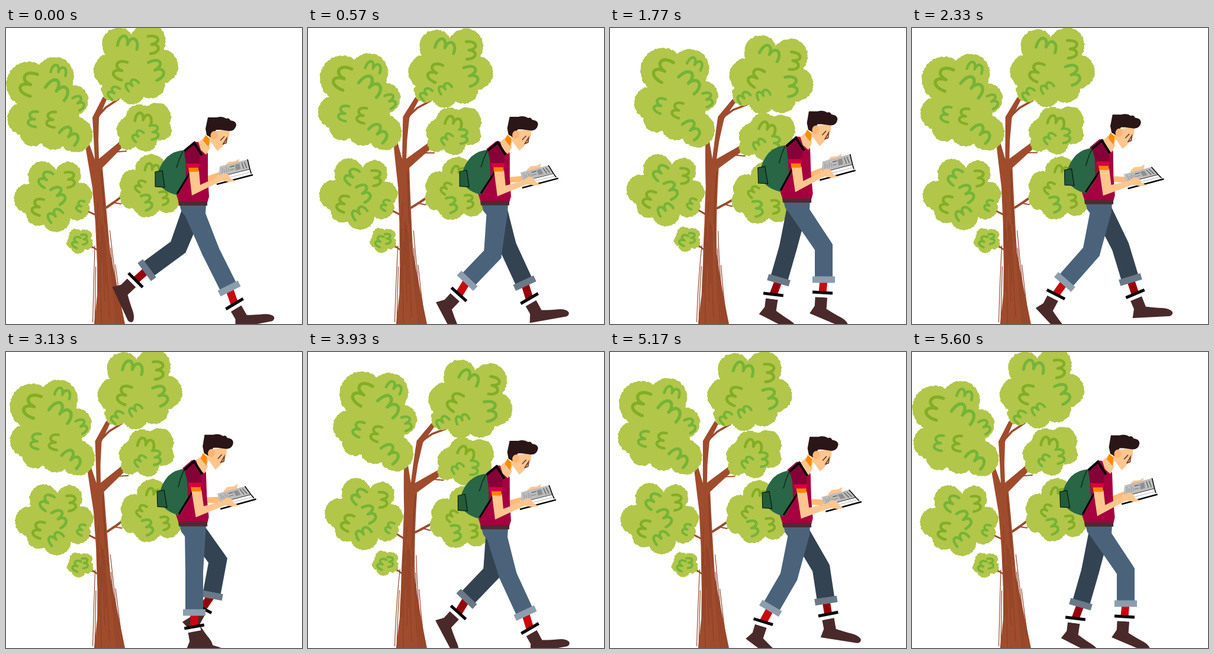
An HTML page with a canvas that plays this animation: 500x500 px, repeating every 5.66 s.

```html
<!DOCTYPE html>
<html lang="en">
<head>
<meta charset="utf-8">
<title>Walking reader</title>
<style>
  html, body { margin: 0; width: 100%; height: 100%; overflow: hidden; background: #fff; }
  canvas { display: block; width: 500px; height: 500px; }
</style>
</head>
<body>
<canvas id="stage" width="500" height="500"></canvas>
<script>
const ctx = document.getElementById('stage').getContext('2d');
const TAU = Math.PI * 2, LOOP = 5660, FRAMES = 141, STRIDE = 24;
const SKIN = '#ffc68e', INK = '#050505';

let seed = 7;
const rand = () => (seed = (seed * 16807) % 2147483647) / 2147483647;
const mix = (a, b, t) => a + (b - a) * t;

// pts is a flat list: x, y, x, y ...
function trace(pts, close) {
  ctx.beginPath();
  for (let i = 0; i < pts.length; i += 2) ctx.lineTo(pts[i], pts[i + 1]);
  if (close) ctx.closePath();
}
function fill(color, pts) {
  trace(pts, true);
  ctx.fillStyle = color;
  ctx.fill();
}
function line(color, width, pts) {
  trace(pts);
  ctx.strokeStyle = color;
  ctx.lineWidth = width;
  ctx.stroke();
}
function shape(color, d) {
  ctx.fillStyle = color;
  ctx.fill(new Path2D(d));
}

// ---------- tree ----------
const SPINE = 163;

function bend(x, y, k) {
  const h = 500 - y, a = k * h, off = x - SPINE;
  return [SPINE + k * h * h / 2 + off * Math.cos(a), y + h * a * a / 6 + off * Math.sin(a), a];
}
function bendAll(pts, k) {
  const out = [];
  for (let i = 0; i < pts.length; i += 2) {
    const n = i + 2 < pts.length ? i + 2 : i;
    for (let j = 0; j < 4; j++) {
      const p = bend(mix(pts[i], pts[n], j / 4), mix(pts[i + 1], pts[n + 1], j / 4), k);
      out.push(p[0], p[1]);
    }
  }
  return out;
}

// lobes: x, y, radius.  marks: x, y, size, turn in degrees, shade.
function crown(cx, cy, lobes, marks) {
  const path = new Path2D();
  for (let i = 0; i < lobes.length; i += 3) {
    const [x, y, r] = lobes.slice(i, i + 3);
    const n = Math.round(r * 2.6), blob = new Path2D();
    for (let j = 0; j < n; j++) {
      const a = j / n * TAU, q = r + (rand() - 0.6) * 2.2;
      blob.lineTo(x - cx + q * Math.cos(a), y - cy + q * Math.sin(a));
    }
    blob.closePath();
    path.addPath(blob);
  }
  return { cx, cy, path, marks };
}

const crowns = [
  crown(243, 267,
    [245,240,27, 215,262,23, 212,285,20, 238,296,24, 272,288,24, 268,255,25, 243,268,34],
    [248,236,13,10,1, 226,266,11,-60,1, 239,294,14,70,0, 268,287,12,75,1]),
  crown(234, 167,
    [255,150,24, 225,152,23, 262,172,18, 210,172,23, 235,188,21, 206,190,16, 240,165,28],
    [233,152,15,10,1, 222,181,11,-50,0, 251,176,13,80,0]),
  crown(222, 60,
    [190,27,28, 240,22,30, 262,65,29, 178,72,30, 245,95,24, 213,106,23, 181,104,20, 220,60,48],
    [207,24,18,12,0, 250,28,16,82,1, 192,70,17,-72,1, 256,70,18,65,0, 181,108,12,-55,0, 212,95,12,-40,0]),
  crown(73, 130,
    [38,95,38, 82,82,33, 113,122,26, 30,153,28, 45,178,22, 80,183,23, 117,180,30, 75,140,50],
    [37,93,21,-72,1, 90,71,14,15,0, 89,103,21,35,0, 124,126,13,60,0, 45,153,14,-82,0, 76,154,14,-85,1, 109,181,18,40,0]),
  crown(80, 285,
    [62,250,25, 105,248,22, 38,288,25, 55,312,22, 85,322,23, 120,304,21, 125,282,21, 80,285,46],
    [66,254,15,-58,0, 109,256,14,80,1, 53,301,15,-75,1, 90,282,16,58,0, 82,315,14,-40,0, 125,300,10,-70,0]),
  crown(124, 360,
    [118,351,12, 133,352,12, 113,362,11, 122,371,11, 136,364,11, 124,360,16],
    [118,361,10,-70,0, 133,357,9,80,0])
];

const trunk = [149,500, 154,450, 154,400, 151,330, 146,270, 133,194, 140,194, 150,222, 148,185, 146,151,
  164,116, 170,121, 157,152, 156,190, 157,221, 199,186, 202,196, 163,236, 168,290, 176,380, 201,500];
const twigs = [
  [3.5, [157,147, 169,134, 190,120]], [4, [170,303, 183,294, 199,282]], [2, [181,295, 194,297]],
  [2, [176,211, 190,209, 203,208]], [3, [152,316, 141,311, 132,306]],
  [2.5, [154,375, 145,369, 142,358]], [2, [148,371, 136,370]]
];
const grain = Array.from({ length: 15 }, (_, i) => {
  const u = (i + 0.6) / 15.5, top = 235 + rand() * 170, end = Math.min(500, top + 70 + rand() * 130);
  const at = y => mix(mix(148, 163, (y - 230) / 270 * -0.6 + 0.35), mix(164, 201, (y - 235) / 265), u);
  return [at(top), top, at((top + end) / 2), (top + end) / 2, at(end), end];
});

function drawMark(x, y, s, turn, shade) {
  ctx.save();
  ctx.translate(x, y);
  ctx.rotate(turn * Math.PI / 180);
  ctx.scale(s, s);
  ctx.beginPath();
  ctx.moveTo(-0.95, 0.5);
  ctx.bezierCurveTo(-1, -0.75, -0.1, -0.8, -0.05, 0.25);
  ctx.bezierCurveTo(0, -0.7, 0.95, -0.65, 0.9, 0.5);
  ctx.restore();
  ctx.strokeStyle = shade ? '#82ae25' : '#75b437';
  ctx.lineWidth = 2.6 + s * 0.13;
  ctx.stroke();
}

function drawTree(k) {
  ctx.lineCap = ctx.lineJoin = 'round';
  for (const [w, pts] of twigs) line('#9b4b2d', w, bendAll(pts, k));
  fill('#9f4c2d', bendAll(trunk, k));
  for (const g of grain) line('#8c3f25', 1.1, bendAll(g, k));
  for (const c of crowns) {
    const [x, y, a] = bend(c.cx, c.cy, k);
    ctx.save();
    ctx.translate(x, y);
    ctx.rotate(a);
    ctx.fillStyle = '#b2c64a';
    ctx.fill(c.path);
    ctx.translate(-c.cx, -c.cy);
    for (let i = 0; i < c.marks.length; i += 5) drawMark(...c.marks.slice(i, i + 5));
    ctx.restore();
  }
  ctx.lineCap = 'butt';
  ctx.lineJoin = 'miter';
}

// ---------- legs ----------
// knee x, y, ankle x, y, band x, y, band angle; one row per two steps of the stride
const gait = [
  [346,378, 377,440, 386,466, -31],
  [338,378, 367,441, 375,467, -30],
  [331,372, 345,441, 349,467, -23],
  [318,372, 318,440, 318,464, -10],
  [302,380, 286,436, 277,460, 7],
  [303,378, 258,429, 243,450, 27],
  [292,380, 239,419, 220,436, 45],
  [312,382, 269,427, 255,450, 42],
  [339,381, 311,428, 299,450, 35],
  [359,362, 348,421, 333,443, 27],
  [361,370, 361,425, 359,447, 3],
  [353,379, 370,435, 378,459, -23]
];

function pose(phase) {
  const u = ((phase / 2) % 12 + 12) % 12, i = Math.floor(u), t = u - i;
  const [a, b, c, d] = [11, 0, 1, 2].map(o => gait[(i + o) % 12]);
  return b.map((v, j) => v + 0.5 * t * (c[j] - a[j] +
    t * (2 * a[j] - 5 * v + 4 * c[j] - d[j] + t * (3 * (v - c[j]) + d[j] - a[j]))));
}

function drawLeg(phase, far, lift) {
  const [kx, ky, ax, ay, bx, by, tilt] = pose(phase);
  const cloth = far ? '#344352' : '#4b637a';
  ctx.save();
  if (far) ctx.translate(-1, -10);

  line(far ? '#98000c' : '#cb0710', 13, [ax, ay, bx, by]);
  ctx.save();
  ctx.translate(bx, by);
  ctx.rotate(tilt * Math.PI / 180);
  shape('#4a292b', 'M-12 8L8.5 8L8 27Q22 35 33 40Q45 46 46 53Q45 58 39 57.5L-20 36L-12 23Z');
  line('#fff', 6, [-13, 5, 10, 5]);
  line(INK, 5, [-17, 0, 17, 0]);
  ctx.restore();

  const hx = 317, hy = 308 + lift;
  const len = Math.hypot(kx - hx, ky - hy), nx = (ky - hy) / len * 15, ny = -(kx - hx) / len * 15;
  line(cloth, 30, [hx, hy, kx, ky, ax, ay]);
  fill(cloth, [293,297 + lift, 296,309 + lift, 303,318 + lift, kx - nx,ky - ny,
    kx + nx,ky + ny, 337,313 + lift, 338,297 + lift]);

  ctx.translate(ax, ay);
  ctx.rotate(Math.atan2(ay - ky, ax - kx) - Math.PI / 2);
  ctx.fillStyle = far ? '#697987' : '#8c9eae';
  ctx.fillRect(-19, -5.5, 38, 11);
  ctx.restore();
}

// ---------- upper body ----------
function drawBook(e) {
  // u runs along the spine side, v from the far edge to the near cover
  const at = (u, v) => [
    mix(361 + 47 * u - 1.5 * e, 356 + 61 * u + 5 * e, v),
    mix(234 - 12 * u + 9 * e, 264 - 16 * u + 5.5 * e, v)
  ];
  const path = (...uv) => uv.flatMap(p => at(...p));
  fill('#fff', path([0, 0.5], [0.95, 0.5], [0.97, 0.95], [0, 0.97]));
  fill('#bdbdbd', path([0, 0], [1, 0], [0.97, 0.62], [0.02, 0.58]));
  for (let i = 0; i < 4; i++) {
    const u = 0.1 + i * 0.07;
    line('#929292', 1, path([u, 0.12 + i % 2 * 0.1], [u + 0.02, 0.45]));
  }
  fill('#8f8f8f', path([0.55, 0.12], [0.7, 0.12], [0.7, 0.46], [0.55, 0.46]));
  line('#5f5f5f', 1.4, path([0.36, 0.18], [0.52, 0.18]));
  line('#777', 1, path([0.36, 0.36], [0.5, 0.36]));
  line('#555', 1.2, path([0.78, 0.1], [0.8, 0.5]));
  line('#555', 1.2, path([0.87, 0.1], [0.89, 0.5]));
  line('#333', 1, path([0, 0.6], [0.96, 0.62]));
  line('#aaa', 0.8, path([0.02, 0.78], [0.95, 0.8]));
  line(INK, 1.6, path([1, 0], [0.97, 0.66], [0.97, 0.9]));
  line(INK, 2.5, path([0, 1], [1, 1]));
}

function drawHead() {
  fill(SKIN, [325,193, 338,182, 350,193, 338,214, 329,206]);
  fill('#ff8a00', [337,181, 344,187, 342,201, 333,190]);
  fill(SKIN, [343,176, 378,171, 377,182, 372,196, 368,196, 365,201, 357,208, 344,190]);
  fill('#fff', [346,192, 357,208, 349,205, 343,200]);
  shape('#2a1517', 'M341 151L356 151Q365 148 372 153Q377 151 379 156Q389 157 389 164Q387 174 377 174L362 172L355 172L346 185L339 181L337 170Z');
  ctx.beginPath();
  ctx.ellipse(351.5, 181, 6, 7, 0.3, 0, TAU);
  ctx.fillStyle = '#ffb674';
  ctx.fill();
  line('#713b31', 1.6, [362,190, 369,183]);
  line('#713b31', 1.6, [366,197, 373,186, 372,194, 367,196]);
}

function drawPack(e) {
  ctx.save();
  ctx.translate(3.6 * e, 0);
  shape('#286645', 'M303 206Q284 207 272 218Q256 235 256 254Q259 275 288 282Q301 267 304 254Z');
  line('#10291c', 1.5, [299,208, 293,221, 288,236]);
  fill('#235b3d', [252,243, 264,241, 268,269, 252,268]);
  line(INK, 1, [252,243, 264,241, 268,269, 252,268, 252,243]);
  ctx.restore();
}

function drawBody(d, e) {
  const g = 3 * d / 145;
  ctx.save();
  ctx.transform(1, 0, -g, 1 - g, g * 295, 3 * d + g * 295);

  // far arm
  const h = 7 * e;
  fill('#ffbb78', [332,253, 364,242 + h, 366,252 + h, 332,262]);
  fill(SKIN, [369,233 + h, 376,226 + h, 387,225 + h, 394,221 + h, 392,230 + h, 378,237 + h]);

  fill('#a5003f', [302,205, 318,192, 329,193, 338,204, 341,213, 341,254, 343,285, 340,295, 292,295, 287,279, 300,258]);
  fill('#492c31', [291,293, 340,293, 340,300, 292,300]);
  drawHead();
  drawPack(e);

  const s = 4.5 * e, m = 2.5 * e;
  line(INK, 3, [315 + s,237, 289 + m,280]);
  fill('#850037', [301 + m,208, 318 + m,194, 329 + m,208, 326 + s,231, 304 + s,231]);
  line(INK, 4, [301 + m,208, 318 + m,194, 331 + m,215]);

  drawBook(e);

  // near arm
  const x = 5 * e, y = 1.5 * e, b = 5.5 * e;
  fill(SKIN, [309 + s,241, 326 + s,241, 328 + x,265 + y, 357 + x,252 + b, 367 + x,245 + b, 375 + x,247 + b,
    379 + x,254 + b, 388 + x,259 + b, 377 + x,260 + b, 364 + x,258 + b, 314 + x,283 + y]);
  fill('#d8003f', [304 + s,229, 327 + s,229, 326 + s,236, 306 + s,236]);
  fill('#ff8200', [308 + s,236, 325 + s,236, 325 + s,243, 309 + s,243]);
  ctx.restore();
}

// ---------- timing ----------
// fifteen steps fill 600 ms, with a longer first one
function stepAt(ms) {
  if (ms >= 5600) return FRAMES - 1;
  const r = ms % 600;
  const k = r < 70 ? 0 : r < 100 ? 1 : r < 130 ? 2 : 3 + Math.floor((r - 130) / 40);
  return Math.floor(ms / 600) * 15 + k;
}

function draw(ms) {
  const step = stepAt(ms), phase = step % STRIDE;
  const bob = Math.cos((phase - 0.7) / 12 * TAU) - 0.93;
  const swing = Math.cos((phase - 9.5) / STRIDE * TAU) + 0.793;
  const sway = (1 - Math.cos(step / FRAMES * 2 * TAU)) / 2;
  ctx.fillStyle = '#fff';
  ctx.fillRect(0, 0, 500, 500);
  drawTree(0.00069 * sway);
  drawLeg(phase + 12, true, 3 * bob);
  drawLeg(phase, false, 3 * bob);
  drawBody(bob, swing);
}

const start = performance.now();
function tick() {
  draw((performance.now() - start) % LOOP);
  requestAnimationFrame(tick);
}
tick();
</script>
</body>
</html>
```
